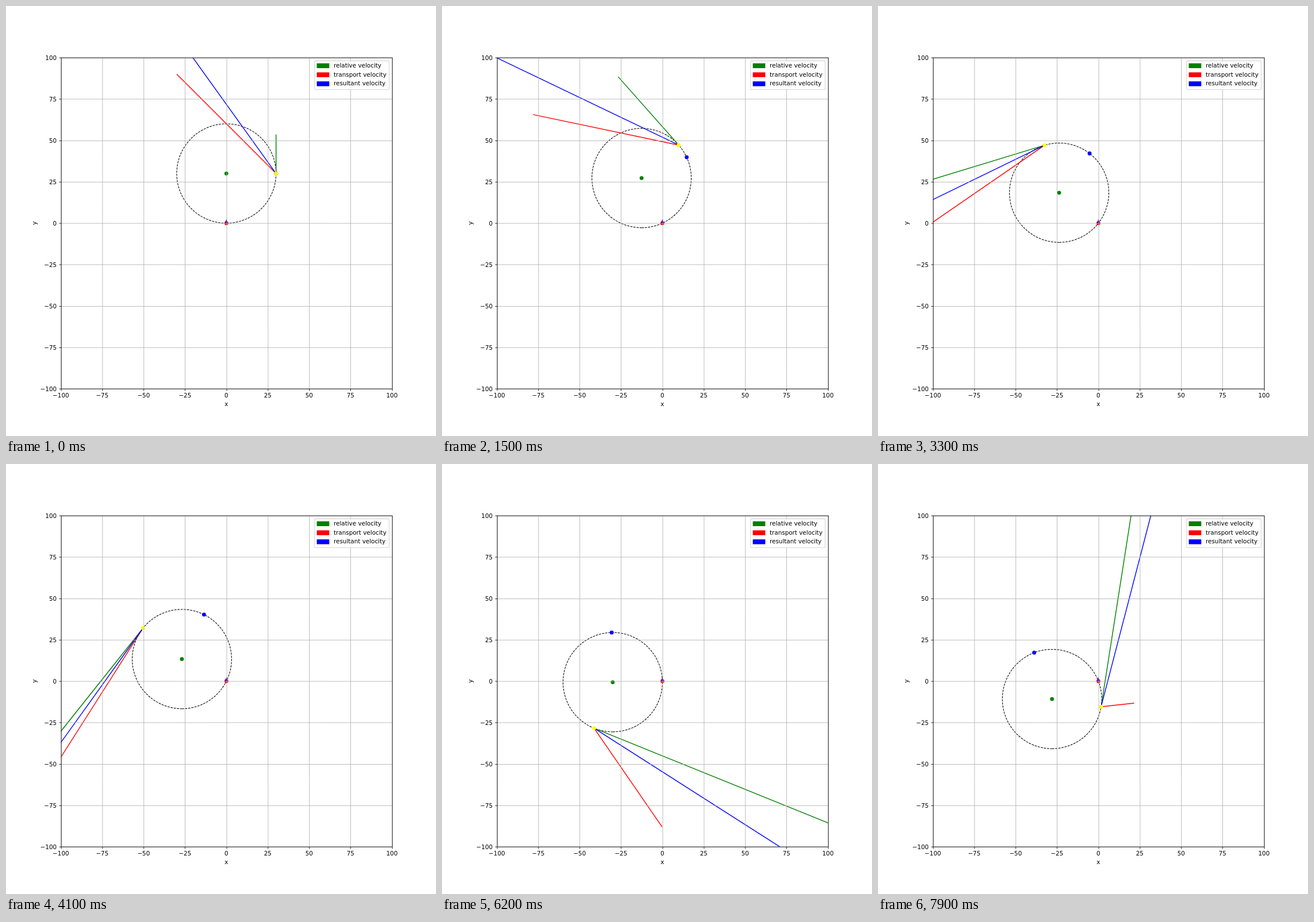
Write an HTML page with a canvas that moves like this. It is 748x748 px and loops after 8 s.

```html
<!DOCTYPE html>
<html lang="en">
<head>
<meta charset="utf-8">
<title>Relative, transport and resultant velocity</title>
<style>
html, body { margin: 0; width: 100%; height: 100%; overflow: hidden; background: #fff; }
canvas { display: block; width: 748px; height: 748px; }
</style>
</head>
<body>
<canvas id="stage" width="748" height="748"></canvas>
<script>
// The figure is laid out on a 1000 unit square and scaled to the stage.
const ctx = document.getElementById('stage').getContext('2d');
const SCALE = 748 / 1000;
const TAU = Math.PI * 2;
const PT = 100 / 72;              // one point in figure units
const SIDE = 770, LEFT = 127.5, TOP = 120;
const UNIT = SIDE / 200;
const R = 30;                     // orbit radius
const STEP = 0.0149, FRAMES = 80, FRAME_MS = 100;
const GREEN = '#008000', RED = '#ff0000', BLUE = '#0000ff', YELLOW = '#ffff00';
const FONT = 10 * PT + 'px "DejaVu Sans", Verdana, sans-serif';
const TICKS = [-100, -75, -50, -25, 0, 25, 50, 75, 100];

const px = x => LEFT + (x + 100) * UNIT;
const py = y => TOP + (100 - y) * UNIT;
const snap = v => Math.floor(v + 0.5) + 0.5;

function line(x1, y1, x2, y2, color, width) {
  ctx.strokeStyle = color;
  ctx.lineWidth = width;
  ctx.beginPath();
  ctx.moveTo(x1, y1);
  ctx.lineTo(x2, y2);
  ctx.stroke();
}

function dot(x, y, color) {
  ctx.fillStyle = color;
  ctx.beginPath();
  ctx.arc(px(x), py(y), UNIT + PT / 2, 0, TAU);
  ctx.fill();
}

function vector(x, y, vx, vy, color) {
  line(px(x), py(y), px(x + vx), py(y + vy), color, 1.9);
}

// Traced point by point so that the dashes run on from the bottom.
function dashedCircle(cx, cy) {
  const steps = 360;
  ctx.strokeStyle = '#000';
  ctx.lineWidth = PT;
  ctx.setLineDash([3.7 * PT, 1.6 * PT]);
  ctx.beginPath();
  for (let i = 0; i <= steps; i++) {
    const a = i / steps * TAU;
    ctx.lineTo(px(cx + R * Math.sin(a)), py(cy - R * Math.cos(a)));
  }
  ctx.stroke();
  ctx.setLineDash([]);
}

function pivotArrow() {
  ctx.fillStyle = BLUE;
  ctx.beginPath();
  ctx.moveTo(px(0), py(2.5));
  ctx.lineTo(px(-0.75), py(0));
  ctx.lineTo(px(0.75), py(0));
  ctx.fill();
}

function drawMotion(t) {
  const omega = 2 - 0.6 * t;
  const phi = 2 * t - 0.3 * t * t;
  const spin = Math.PI / 4 + 1.5 * Math.PI * t;
  const theta = phi + Math.PI / 4 * t + 0.75 * Math.PI * t * t;
  const cx = -R * Math.sin(phi), cy = R * Math.cos(phi);
  const dx = R * Math.cos(theta), dy = R * Math.sin(theta);
  const x = cx + dx, y = cy + dy;
  const rel = [-dy * spin, dx * spin];
  const tra = [-y * omega, x * omega];

  ctx.save();
  ctx.beginPath();
  ctx.rect(LEFT, TOP, SIDE, SIDE);
  ctx.clip();

  dashedCircle(cx, cy);
  dot(0, 0, RED);
  pivotArrow();
  dot(cx, cy, GREEN);
  dot(cx + R * Math.cos(phi), cy + R * Math.sin(phi), BLUE);
  vector(x, y, rel[0], rel[1], GREEN);
  vector(x, y, tra[0], tra[1], RED);
  vector(x, y, rel[0] + tra[0], rel[1] + tra[1], BLUE);
  dot(x, y, YELLOW);
  ctx.restore();
}

function text(str, x, y, align) {
  ctx.font = FONT;
  ctx.fillStyle = '#000';
  ctx.textAlign = align;
  ctx.textBaseline = 'alphabetic';
  ctx.fillText(str, x, y);
}

function drawAxes() {
  const x0 = snap(px(-100)), x1 = snap(px(100));
  const y0 = snap(py(100)), y1 = snap(py(-100));
  const thin = 0.8 * PT, tick = 3.5 * PT;

  for (const v of TICKS) {
    const x = snap(px(v)), y = snap(py(v));
    line(x, y0, x, y1, '#b0b0b0', thin);
    line(x0, y, x1, y, '#b0b0b0', thin);
  }
  for (const v of TICKS) {
    const x = snap(px(v)), y = snap(py(v));
    const label = String(v).replace('-', '\u2212');
    line(x, y1, x, y1 + tick, '#000', thin);
    line(x0, y, x0 - tick, y, '#000', thin);
    text(label, px(v), 911, 'center');
    text(label, LEFT - 2 * tick, py(v) + 5.4, 'right');
  }
  ctx.strokeStyle = '#000';
  ctx.lineWidth = thin;
  ctx.strokeRect(x0, y0, x1 - x0, y1 - y0);

  text('x', px(0), 930, 'center');
  ctx.save();
  ctx.translate(71, py(0));
  ctx.rotate(-Math.PI / 2);
  text('y', 0, 0, 'center');
  ctx.restore();
}

function drawLegend() {
  ctx.fillStyle = 'rgba(255,255,255,0.8)';
  ctx.strokeStyle = 'rgba(204,204,204,0.8)';
  ctx.lineWidth = PT;
  ctx.beginPath();
  ctx.roundRect(717.5, 127.5, 173.5, 67, 2.8);
  ctx.fill();
  ctx.stroke();
  [['relative', GREEN], ['transport', RED], ['resultant', BLUE]].forEach(([name, color], i) => {
    const base = 143 + i * 21;
    ctx.fillStyle = color;
    ctx.fillRect(722.8, base - 9.7, 29, 11.2);
    text(name + ' velocity', 762, base, 'left');
  });
}

function draw(now) {
  const n = Math.floor(now / FRAME_MS) % FRAMES;
  ctx.setTransform(SCALE, 0, 0, SCALE, 0, 0);
  ctx.fillStyle = '#fff';
  ctx.fillRect(0, 0, 1000, 1000);
  drawMotion(n * STEP);
  drawAxes();
  drawLegend();
}

let start = null;
function loop(now) {
  if (start === null) start = now;
  draw(Math.max(0, now - start));
  requestAnimationFrame(loop);
}
draw(0);
requestAnimationFrame(loop);
</script>
</body>
</html>
```
